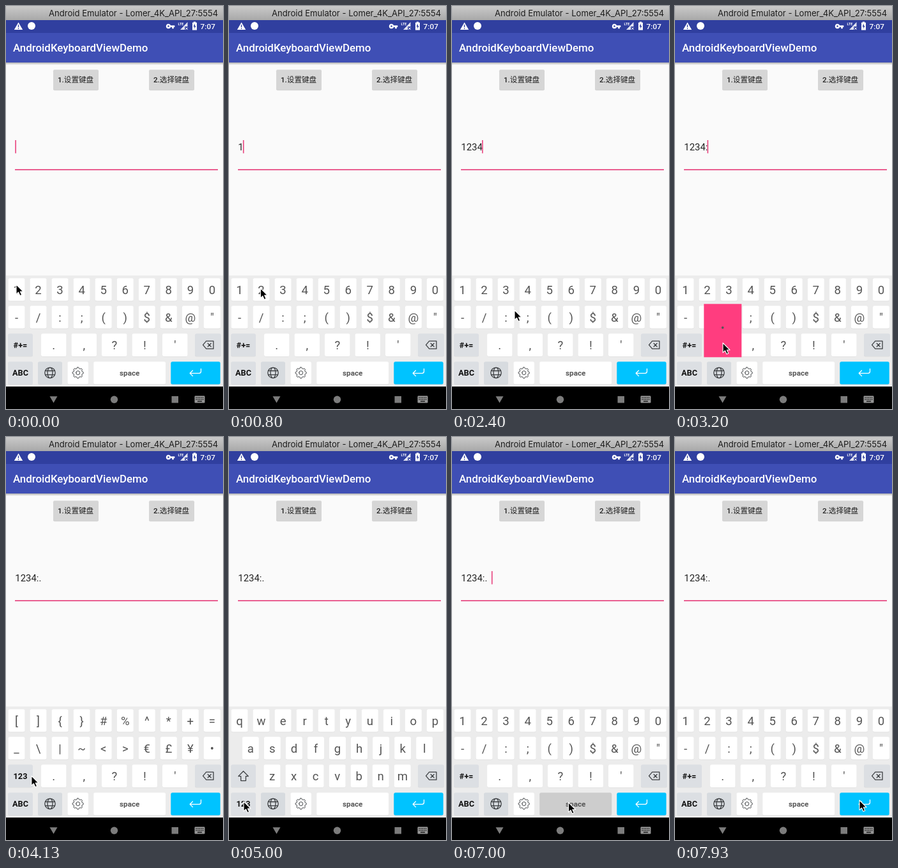
These frames come from a looping animation (340x628 px, 8000 ms). An HTML page:

```html
<!DOCTYPE html>
<html lang="en">
<head>
<meta charset="utf-8">
<title>Keyboard demo</title>
<style>
html, body { margin: 0; width: 100%; height: 100%; overflow: hidden; background: #fafafa; }
svg { display: block; width: 100vw; height: 100vh; }
text { font-family: Roboto, "Noto Sans CJK SC", "Noto Sans CJK", sans-serif; white-space: pre; }
.key { font-size: 18.6px; fill: #555; text-anchor: middle; }
.mod { font-size: 12.7px; font-weight: 700; fill: #111; text-anchor: middle; }
.btn { font-size: 11.6px; font-weight: 500; fill: #222; }
.line { fill: none; stroke: #3c3f42; stroke-width: 1.3; stroke-linejoin: round; stroke-linecap: round; }
</style>
</head>
<body>
<svg viewBox="0 0 340 628" preserveAspectRatio="none">
  <defs>
    <linearGradient id="bar" x2="0" y2="1"><stop stop-color="#c9c9c9"/><stop offset="1" stop-color="#a8a8a8"/></linearGradient>
    <linearGradient id="shade" x2="0" y2="1"><stop stop-color="#000" stop-opacity=".3"/><stop offset="1" stop-color="#000" stop-opacity="0"/></linearGradient>
  </defs>
  <rect width="340" height="628" fill="#fafafa"/>

  <rect width="340" height="22" fill="url(#bar)"/>
  <text x="67" y="16" font-size="13.1" fill="#1c1c1c" style="font-family:Inter,sans-serif">Android Emulator - Lomer_4K_API_27:5554</text>

  <rect y="22" width="340" height="20" fill="#303f9f"/>
  <rect y="42" width="340" height="46" fill="#3f4fb5"/>
  <rect y="88" width="340" height="4" fill="url(#shade)"/>
  <text x="11" y="71.2" font-size="16.9" font-weight="500" fill="#fff">AndroidKeyboardViewDemo</text>

  <g fill="#fff">
    <path d="M19.5 25.5 26.2 37H12.8Z"/>
    <path d="M19.5 29.3v3.8m0 1.2v1.4" stroke="#303f9f" stroke-width="1.4"/>
    <circle cx="40" cy="31" r="6"/>
    <path fill-rule="evenodd" d="M254.5 27.7a3.8 3.8 0 0 1 3.6 2.6h6.2v2.7h-1.5v2.3h-2.6V33h-2.1a3.8 3.8 0 1 1-3.6-5.3Zm0 2.5a1.3 1.3 0 1 0 0 2.6 1.3 1.3 0 0 0 0-2.6Z"/>
    <text x="269.5" y="29.6" font-size="5.4" font-weight="700">LTE</text>
    <path d="M284.5 25v7h-4.3v5H273Z" opacity=".85"/>
    <path d="m281.3 33.5 3.4 3.4m0-3.4-3.4 3.4" stroke="#fff"/>
    <path d="M293.8 25.7V24.4h3.4v1.3h1.8V37.5h-7V25.7Z"/>
    <path d="m296 27.5-2.4 4.6h1.6v3.4l2.3-4.5h-1.5Z" fill="#303f9f"/>
    <text x="304.6" y="36" font-size="11.8" font-weight="500">7:07</text>
  </g>

  <g fill="#d6d6d6">
    <rect x="74" y="100.5" width="71" height="31" rx="2" fill="#b5b5b5" opacity=".6"/>
    <rect x="224" y="100.5" width="71" height="31" rx="2" fill="#b5b5b5" opacity=".6"/>
    <rect x="74" y="99.3" width="71" height="31.3" rx="2"/>
    <rect x="224" y="99.3" width="71" height="31.3" rx="2"/>
  </g>
  <text class="btn" x="81" y="119.3">1.设置键盘</text>
  <text class="btn" x="231" y="119.3">2.选择键盘</text>

  <text id="typed" x="14.3" y="225" font-size="14.9" fill="#222"></text>
  <rect id="caret" y="209" width="1.6" height="20.5" fill="#e8407c"/>
  <rect x="14" y="254.3" width="318" height="1.6" fill="#e63a78"/>

  <rect y="420" width="340" height="173" fill="#ececec"/>
  <g id="keys"></g>
  <g id="popup">
    <rect height="83" fill="#ff3d7f"/>
    <text y="39" font-size="33" fill="#555" text-anchor="middle"></text>
  </g>

  <rect y="593" width="340" height="35" fill="#000"/>
  <g fill="#7c7c7c">
    <path d="M68.5 608.3h12l-6 10.2Z"/>
    <circle cx="169.5" cy="613.3" r="5.7"/>
    <rect x="259.5" y="608" width="10.5" height="10.5"/>
    <rect x="295.5" y="607.5" width="16" height="11" rx="1.2" fill="#959595"/>
    <path d="M297.5 610.3h12m-12 2.8h12" stroke="#000" stroke-width="1.3" stroke-dasharray="1.4 1.2"/>
    <path d="M300 616h7" stroke="#000" stroke-width="1.2"/>
  </g>

  <path id="mouse" d="M0 0V15.2L3.5 12 6 17.5 8.7 16.3 6.3 11H11Z" fill="#000" stroke="#fff" stroke-width="1.1" stroke-linejoin="round"/>
</svg>
<script>
const LOOP = 8000, SVG = 'http://www.w3.org/2000/svg';
const $ = id => document.getElementById(id);
const ROWS = [424, 467, 510.3, 554];
const WHITE = '#fff', GREY = '#dcdfe3', DOWN = '#cdcdcd';

function add(parent, tag, attrs, label) {
  const el = document.createElementNS(SVG, tag);
  for (const k in attrs) el.setAttribute(k, attrs[k]);
  if (label) el.textContent = label;
  parent.appendChild(el);
  return el;
}

function key(g, cx, row, w, label, fill = WHITE, cls = 'key') {
  const y = ROWS[row], x = cx - w / 2;
  add(g, 'rect', { x, y: y + .9, width: w, height: 35.4, rx: 2.5, fill: '#dcdcdc' });
  const face = add(g, 'rect', { x, y: y + .3, width: w, height: 35.3, rx: 2.5, fill });
  if (label) add(g, 'text', { x: cx, y: y + (cls === 'key' ? 24.6 : 22.4), class: cls }, label);
  return face;
}

const icon = (g, d, attrs) => add(g, 'path', { d, class: 'line', ...attrs });

function row(g, chars, r, first, step = 34.05, w = 26) {
  [...chars].forEach((c, i) => key(g, first + i * step, r, w, c));
}

const board = $('keys');

function layout(rows, third, corner) {
  const g = add(board, 'g', {});
  row(g, rows[0], 0, 16.5);
  row(g, rows[1], 1, rows[1].length === 9 ? 33.8 : 16.5);
  if (rows[2]) row(g, rows[2], 2, 67.5);
  else row(g, ".,?!'", 2, 74.8, 47.5, 39.5);
  key(g, 22.5, 2, 39, third, GREY, 'mod');
  if (!third) icon(g, 'M22.5 520.8 30.3 528.6H26.4V535.6H18.6V528.6H14.7Z');
  return { g, corner: key(g, 22.5, 3, 39, corner, GREY, 'mod') };
}

const modes = {
  num: layout(['1234567890', '-/:;()$&@"'], '#+=', 'ABC'),
  sym: layout(['[]{}#%^*+=', '_\\|~<>€£¥•'], '123', 'ABC'),
  abc: layout(['qwertyuiop', 'asdfghjkl', 'zxcvbnm'], '', '123')
};

// keys shared by every layout
key(board, 316.5, 2, 41, '', GREY);
icon(board, 'M313.7 522.2H325V534.2H313.7L308.6 528.2ZM316.2 525.7 321.2 530.7M321.2 525.7 316.2 530.7');
key(board, 69, 3, 38, '', '#d7dbdf');
icon(board, 'M60.8 571.6a8.2 8.2 0 1 0 16.4 0a8.2 8.2 0 1 0-16.4 0ZM65 571.6a4 8.2 0 1 0 8 0a4 8.2 0 1 0-8 0ZM61.7 568.5H76.3M61.7 574.7H76.3');
key(board, 112.7, 3, 32.5, '');
const gear = Array.from({ length: 48 }, (_, i) => {
  const a = i * Math.PI / 24, r = 7.7 + Math.tanh(2.5 * Math.cos(8 * a)) * .9;
  return (112.7 + r * Math.sin(a)).toFixed(2) + ' ' + (571.6 - r * Math.cos(a)).toFixed(2);
}).join('L');
icon(board, 'M' + gear + 'ZM109.7 571.6a3 3 0 1 0 6 0a3 3 0 1 0-6 0Z', { style: 'stroke-width:1' });
const space = key(board, 193.7, 3, 113, 'space', WHITE, 'mod');
const spaceLabel = board.lastChild;
spaceLabel.style.cssText = 'font-size:11.7px;fill:#555';
key(board, 297, 3, 77.4, '', '#00c3ff');
icon(board, 'M305.5 565.5V569.5Q305.5 572.3 302.5 572.3H288.5M292.5 568 288.2 572.3 292.5 576.6', { style: 'stroke:#fff' });

// [down, up, character, key centre, row, popup width]
const TAPS = [
  [250, 450, '1', 16.5, 0, 39],
  [850, 1050, '2', 50.5, 0, 39],
  [1480, 1690, '3', 84.5, 0, 39],
  [2000, 2160, '4', 118.5, 0, 39],
  [2620, 2800, ':', 84.5, 1, 39],
  [3180, 3350, '.', 74.8, 2, 59],
  [6480, 6620, ' '],
  [6820, 7060, ' ']
];
const SPACE_LAG = 130;

// pointer stops: time, x, y
const PATH = [
  [0, 16, 434], [480, 16, 434], [830, 50, 440], [1060, 50, 440], [1430, 98, 448],
  [1700, 99, 448], [1970, 114, 447], [2170, 114, 447], [2400, 98, 474], [2590, 86, 482],
  [2820, 86, 482], [3150, 75, 525], [3370, 75, 525], [3700, 38, 528], [4200, 40, 528],
  [4580, 23, 568], [5960, 23, 568], [6430, 182.5, 569.5], [7120, 182.5, 569.5], [7780, 289, 566], [LOOP, 289, 566]
];

const pen = document.createElement('canvas').getContext('2d');
const within = (t, a, b) => t >= a && t < b;

function pointer(t) {
  const i = Math.max(1, PATH.findIndex(p => p[0] > t));
  const [t0, x0, y0] = PATH[i - 1], [t1, x1, y1] = PATH[i];
  const u = (t - t0) / (t1 - t0), e = u * u * (3 - 2 * u);
  return [x0 + (x1 - x0) * e, y0 + (y1 - y0) * e];
}

function draw(t) {
  let text = '', last = 0, pop = null, held = false;
  for (const tap of TAPS) {
    const [down, up, c] = tap, at = c === ' ' ? down + SPACE_LAG : up;
    if (t >= at) { text += c; last = at; }
    if (within(t, down, up)) c === ' ' ? held = true : pop = tap;
  }

  $('typed').textContent = text;
  pen.font = '14.9px Roboto, sans-serif';
  $('caret').setAttribute('x', 14.3 + Math.max(0, pen.measureText(text).width - .8));
  $('caret').style.display = (t - last) % 1000 < 500 ? '' : 'none';

  const mode = within(t, 3900, 4780) ? 'sym' : within(t, 4780, 5950) ? 'abc' : 'num';
  for (const m in modes) modes[m].g.style.display = m === mode ? '' : 'none';
  modes.sym.corner.setAttribute('fill', within(t, 4650, 4780) ? DOWN : GREY);
  modes.abc.corner.setAttribute('fill', within(t, 5800, 5950) ? DOWN : GREY);
  space.setAttribute('fill', held ? DOWN : WHITE);

  const popup = $('popup');
  popup.style.display = pop ? '' : 'none';
  if (pop) {
    const [, , c, cx, r, w] = pop, [box, glyph] = popup.children;
    popup.setAttribute('transform', `translate(${cx - w / 2} ${ROWS[r] - 46})`);
    box.setAttribute('width', w);
    glyph.setAttribute('x', w / 2);
    glyph.textContent = c;
  }
  $('mouse').setAttribute('transform', `translate(${pointer(t)})`);
}

const start = performance.now();
function tick() {
  draw((performance.now() - start) % LOOP);
  requestAnimationFrame(tick);
}
tick();
</script>
</body>
</html>
```
